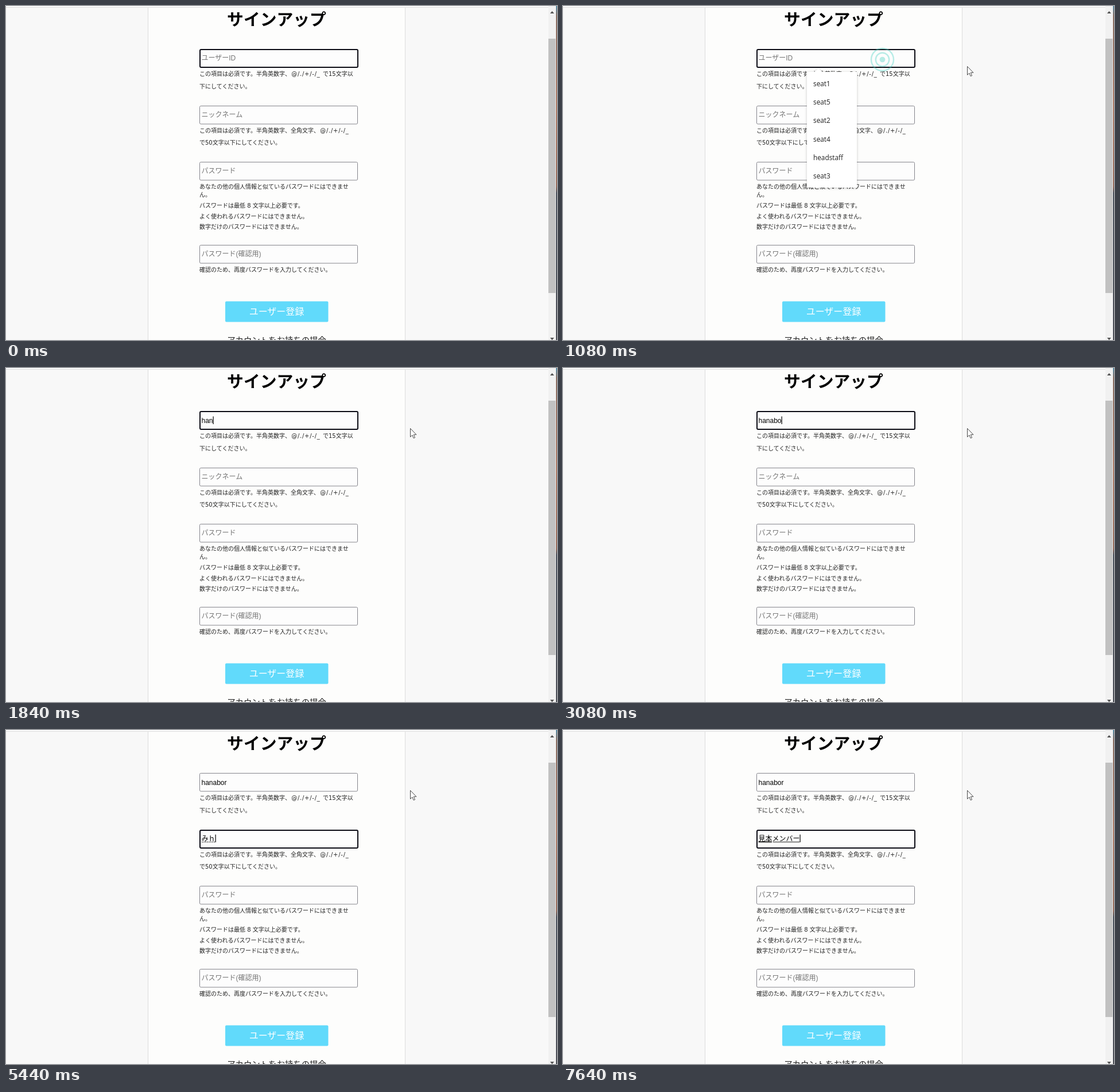
Write an HTML page that moves like this. It is 960 px wide and 583 px high and loops after 8 s.

```html
<!DOCTYPE html>
<html lang="ja">
<head>
<meta charset="utf-8">
<title>サインアップ</title>
<style>
  html, body { margin: 0; width: 100%; height: 100%; overflow: hidden; background: #f8f8f8; }
  svg { display: block; width: 960px; height: 583px; }
  text { font-family: "DejaVu Sans", "Noto Sans CJK JP", "Noto Sans CJK", sans-serif; white-space: pre; }
  .note { font-size: 10px; fill: #222; }
  .field { font-size: 12px; font-family: "Liberation Sans", "Noto Sans CJK JP", "Noto Sans CJK", sans-serif; }
  .hint { fill: #757575; }
  .item { font-size: 11.8px; fill: #222; font-family: "Open Sans", "Noto Sans CJK JP", "Noto Sans CJK", sans-serif; }
  .kana { font-size: 11px; letter-spacing: -1px; font-feature-settings: "palt"; }
  .popup { filter: drop-shadow(0 1px 2px rgba(0, 0, 0, .22)); }
</style>
</head>
<body>
<svg id="stage" viewBox="0 0 960 583">
  <defs>
    <linearGradient id="edge" x1="0" y1="0" x2="0" y2="1">
      <stop offset="0" stop-color="#2a7396"/><stop offset=".03" stop-color="#6d4a3c"/>
      <stop offset=".3" stop-color="#9a5a40"/><stop offset=".54" stop-color="#7d4733"/>
      <stop offset=".56" stop-color="#1d2533"/><stop offset="1" stop-color="#20242e"/>
    </linearGradient>
  </defs>
  <rect width="960" height="583" fill="#f8f8f8"/>
  <rect x="247.5" y="2.5" width="448" height="590" fill="#fdfdfc" stroke="#dcdcdc"/>
  <rect width="945" height="2" fill="#fdfdfd"/>
  <path d="M0 2.5H945" stroke="#dcdcdc"/>
  <text x="471.5" y="34" font-size="28.8" font-weight="700" text-anchor="middle">サインアップ</text>
  <g id="form"></g>
  <rect x="382" y="515.5" width="179.5" height="36" rx="2" fill="#61dafb"/>
  <text x="471.5" y="538.5" font-size="16" fill="#fff" text-anchor="middle">ユーザー登録</text>
  <text x="471.5" y="589" font-size="14.4" fill="#222" text-anchor="middle">アカウントをお持ちの場合</text>
  <g id="typing"></g>
  <g id="popups"></g>
  <g id="ring" fill="none" stroke="#3fcfc0" stroke-width="1.5">
    <circle r="12"/><circle r="7.2"/><circle r="3" fill="#3fcfc0" stroke="none"/>
  </g>
  <rect x="945" width="13.5" height="583" fill="#f1f1f1"/>
  <rect x="945" y="57" width="12.5" height="444" fill="#c1c1c1"/>
  <path d="M948 13l3.5-4 3.5 4zM948 579l3.5 4 3.5-4z" fill="#505050"/>
  <rect x="958.5" width="1.5" height="583" fill="url(#edge)"/>
  <path id="beam" d="M546.5 84.5h2l1 1 1-1h2M549.5 85v15M546.5 100.5h2l1-1 1 1h2" fill="none" stroke="#222"/>
  <path id="arrow" d="M0 0V14.8L3.4 11.6 5.7 17 8 16 5.8 10.8H10.4Z" fill="#fff" stroke="#333" stroke-width=".9"/>
</svg>
<script>
const LOOP = 8000, STEP = 40;
const $ = id => document.getElementById(id);
const clamp = v => Math.min(1, Math.max(0, v));
const text = (x, y, str, cls) => `<text x="${x}" y="${y}" class="${cls}">${str}</text>`;
const setAll = (el, attrs) => Object.entries(attrs).forEach(([k, v]) => el.setAttribute(k, v));

// Form: input tops with placeholders, then notes
const inputs = [[75, "ユーザーID"], [174, "ニックネーム"], [272, "パスワード"], [417, "パスワード(確認用)"]];
const notes = [
  [337, 118, "この項目は必須です。半角英数字、"], [552, 118, "で15文字以"],
  [337, 140, "下にしてください。"],
  [337, 217, "この項目は必須です。半角英数字、全角文字、"],
  [337, 238.5, "で50文字以下にしてください。"],
  [337, 315, "あなたの他の個人情報と似ているパスワードにはできませ"], [337, 329.5, "ん。"],
  [337, 348.5, "パスワードは最低 8 文字以上必要です。"],
  [337, 367, "よく使われるパスワードにはできません。"],
  [337, 385.5, "数字だけのパスワードにはできません。"],
  [337, 460, "確認のため、再度パスワードを入力してください。"]
];
const symbols = (x, y) => `<text x="${x}" y="${y + 3.8}" class="note" letter-spacing=".75">@/./+/-/_</text>`;
$("form").innerHTML =
  inputs.map(([y, hint]) =>
    '<rect class="box" rx="2" fill="#fdfdfd"/>' + text(340.5, y + 20.3, hint, "field hint")).join("") +
  notes.map(([x, y, s]) => text(x, y + 3.8, s, "note")).join("") +
  symbols(497.2, 118) + symbols(547.2, 217);
const boxes = document.querySelectorAll(".box");
const hints = document.querySelectorAll(".hint");

// Suggestion popups: show and hide times are in ms
const popups = [
  { top: 115, width: 87, height: 202, first: 135.5, show: 0, showFor: 80, hide: 1570, cls: "item",
    items: ["seat1", "seat5", "seat2", "seat4", "headstaff", "seat3"] },
  { top: 213, width: 76, height: 106, first: 234, show: 3880, showFor: 120, hide: 5090, cls: "item kana",
    items: ["メンバー 4", "メンバー 5", "メンバー 6"] }
];
$("popups").innerHTML = popups.map(p =>
  `<g><path class="popup" fill="#fff" d="M425 ${p.top}h13l7-6 7 6h${p.width - 27}v${p.height}h-${p.width}z"/>` +
  p.items.map((s, i) => text(436, p.first + 4.2 + i * 32.3, s, p.cls)).join("") + "</g>").join("");
popups.forEach((p, i) => p.el = $("popups").children[i]);

// Keystrokes: [time, text]
const keys = [
  [[0, ""], [1640, "h"], [1760, "ha"], [1840, "han"], [2600, "hana"], [2680, "hanab"], [3080, "hanabo"], [3280, "hanabor"]],
  [[0, ""], [5120, "ｍ"], [5240, "み"], [5440, "みｈ"], [5640, "みほ"], [5720, "みほん"],
   [6080, "みほんｍ"], [6160, "みほんめ"], [6320, "みほんめん"], [7080, "みほんめんｂ"],
   [7120, "みほんめんば"], [7200, "みほんめんばー"], [7600, "見本メンバー"]]
];
const caretFlips = [560, 1080, 1640, 2400, 2600, 3600, 3920, 4360, 4680, 6600, 7080];
const CONVERTED = 7600, LEFT = 340.5;
$("typing").innerHTML = text(LEFT, 95.5, "", "field") + text(LEFT, 193.5, "", "field") +
  '<path id="thin" stroke="#222"/><path id="thick" stroke="#111" stroke-width="1.8"/>' +
  '<rect id="caret" width="1.2" height="13.5"/>';
const typed = $("typing").querySelectorAll("text");

function drawFields(t) {
  const focus = t < 3920 ? 0 : 1;
  boxes.forEach((box, i) => {
    const y = inputs[i][0];
    setAll(box, i === focus
      ? { x: 338, y: y + 1, width: 275, height: 31, stroke: "#0b0b14", "stroke-width": 2 }
      : { x: 337.5, y: y + .5, width: 275, height: 31.5, stroke: "#85858c", "stroke-width": 1 });
  });
  keys.forEach((list, i) => {
    const value = list.filter(k => k[0] <= t).pop()[1];
    typed[i].textContent = value;
    hints[i].style.display = value ? "none" : "";
  });
  const width = typed[focus].textContent ? typed[focus].getComputedTextLength() : 0;
  const caret = $("caret");
  setAll(caret, { x: LEFT + width, y: focus ? 182.5 : 84.5 });
  caret.style.display = caretFlips.filter(f => f <= t).length % 2 ? "" : "none";

  // Composition underline
  const done = t >= CONVERTED, composing = focus && width;
  setAll($("thin"), {
    d: composing ? `M${LEFT + (done ? 25 : .5)} 195.5H${LEFT + width - .5}` : "",
    "stroke-dasharray": done ? "none" : "2 1"
  });
  $("thick").setAttribute("d", done ? `M${LEFT} 195.3h23.5` : "");
}

function drawPopups(t) {
  for (const p of popups) {
    const out = clamp((t - p.hide) / 250);
    const cx = 425 + p.width / 2, cy = p.top + p.height / 2;
    setAll(p.el, {
      opacity: clamp((t - p.show) / p.showFor) * (1 - out),
      transform: `translate(${cx} ${cy}) scale(${1 - .04 * out}) translate(${-cx} ${-cy})`
    });
  }
}

function drawPointer(t) {
  const move = clamp((t - 240) / 160), ease = 1 - (1 - move) ** 2;
  $("beam").style.display = t >= 80 && t < 280 ? "" : "none";
  $("arrow").style.display = t >= 280 ? "" : "none";
  $("arrow").setAttribute("transform", `translate(${549 + 155.5 * ease} ${90 + 15.5 * ease})`);

  // Click ring grows, then fades
  const p = clamp((t - 510) / 730), grow = 1 - (1 - p) ** 3;
  setAll($("ring"), {
    transform: `translate(556.5 93.5) scale(${1.6 * grow * (1 + .12 * (1 - p))})`,
    opacity: t < 560 ? 0 : clamp((1 - p) / .6)
  });
}

function frame(now) {
  const t = Math.floor(now % LOOP / STEP) * STEP;
  drawFields(t);
  drawPopups(t);
  drawPointer(t);
  requestAnimationFrame(() => frame(performance.now()));
}
frame(0);
</script>
</body>
</html>
```
